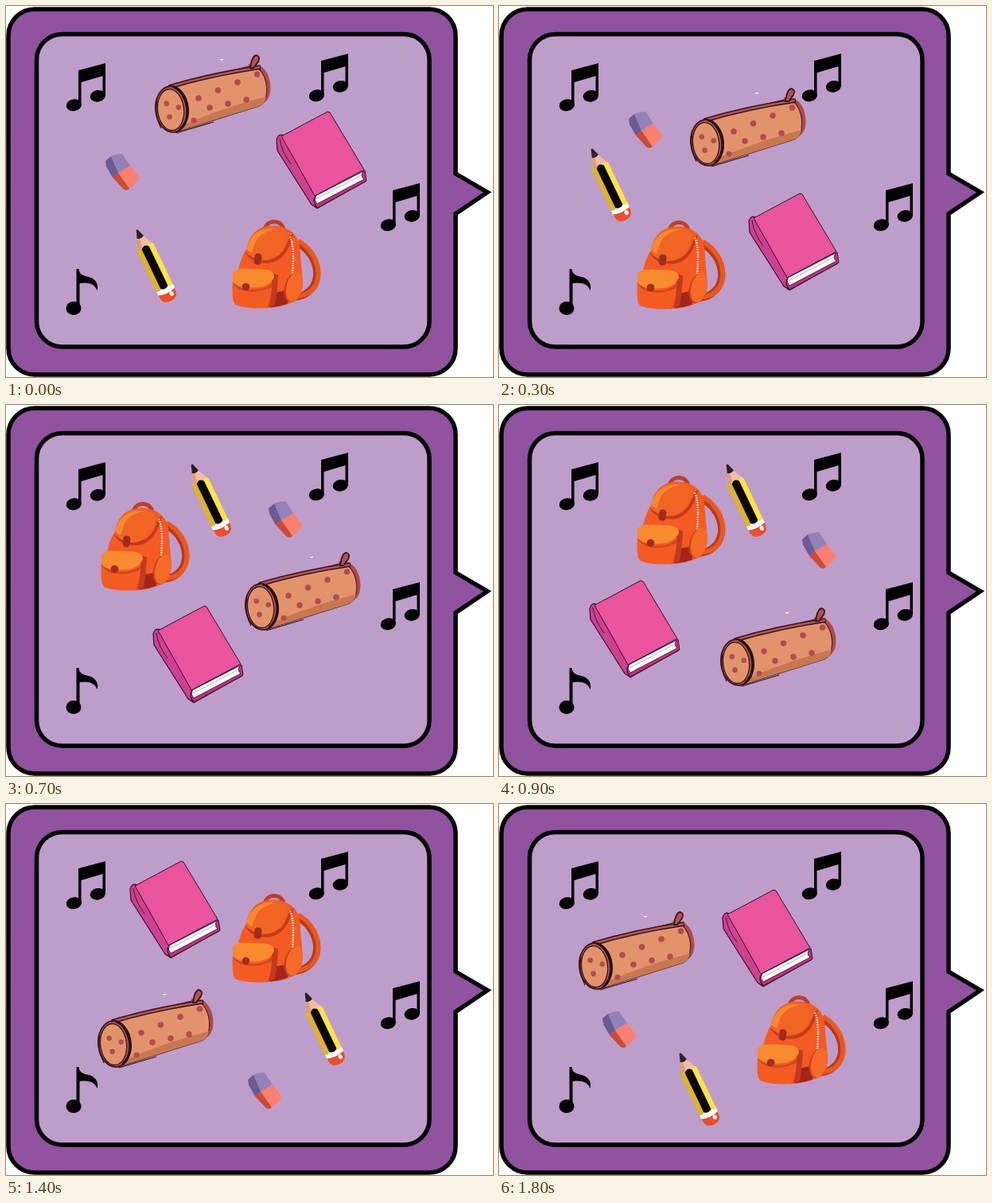
Animation of 612x467 px, one loop 1.9 s. Source, as an HTML page:

```html
<!DOCTYPE html>
<html lang="en">
<head>
<meta charset="utf-8">
<title>School things</title>
<style>
html, body { margin: 0; width: 100%; height: 100%; overflow: hidden; background: #fff; }
svg { display: block; }
</style>
</head>
<body>
<svg width="612" height="467" viewBox="0 0 612 467">
  <defs>
    <g id="pair">
      <path d="M91 81 125 72V113H121.500V88L94.500 96V125H91Z"/>
      <ellipse cx="85.300" cy="124.800" rx="9.700" ry="7.400" transform="rotate(-10 85.300 124.800)"/>
      <ellipse cx="115.300" cy="113.300" rx="9.700" ry="7.300" transform="rotate(-10 115.300 113.300)"/>
    </g>
  </defs>

  <path fill="#9152a0" stroke="#000" stroke-width="5.500" stroke-miterlimit="8"
    d="M36 4H532A33 33 0 0 1 565 37V211L605 234.500 565 261.500V431A33 33 0 0 1 532 464H36A33 33 0 0 1 3 431V37A33 33 0 0 1 36 4Z"/>
  <rect x="38.500" y="35.500" width="493.500" height="393.500" rx="32" fill="#be9dcb" stroke="#000" stroke-width="5.500"/>

  <use href="#pair"/>
  <use href="#pair" x="305" y="-12"/>
  <use href="#pair" x="395" y="151"/>
  <path d="M88.500 331H91.500C92 338 98 340 104 341 112 343 117 350 114.500 358 112 351 105 347 92.500 349V381H88.500Z"/>
  <ellipse cx="85" cy="380.500" rx="9.500" ry="8.500"/>

  <g id="eraser">
    <path fill="#9381b9" d="M132 189Q140 186 146 186L156 201 141 210Z"/>
    <path fill="#6c5a93" d="M125 195 132 189 141 210 134 216 126 202Z"/>
    <path fill="#fb8070" d="M141 210 156 201 166 214Q168 218 163 223L154 231Z"/>
    <path fill="#cb4a38" d="M134 216 141 210 155 230Q152 233 148 231Z"/>
  </g>

  <g id="pencil">
    <g transform="translate(164.500 282) rotate(-25.500)">
      <path fill="#f5bd9f" d="M-4 10H4L11.500 26H-11.500Z"/>
      <path fill="#dc9d80" d="M-4 10H-1L-4 26H-11.500Z"/>
      <path fill="#2b2028" d="M-1 0Q1-1 1.500 1L4.500 10Q0 13-4.500 10Z"/>
      <path fill="#dfb424" d="M-11.500 24Q-8 20-4 25V84H-11.500Z"/>
      <path fill="#ffe24c" d="M4 25Q8 20 11.500 24V84H4Z"/>
      <path fill="#0a0708" d="M-5 25Q0 19 5 25V82H-5Z"/>
      <path fill="#e8502c" d="M-11 86H11V90Q10 99 0 99-10 99-11 90Z"/>
      <path fill="#fff" d="M-11.500 81Q-7 83-5 80 0 84 5 80 8 83 11.500 81V86Q0 90-11.500 86Z"/>
      <ellipse cx="5" cy="91" rx="2.500" ry="3" fill="#fff"/>
    </g>
  </g>

  <g id="bag">
    <g transform="translate(-1 -.5)">
      <g fill="none">
        <path stroke="#bd3f29" stroke-width="5" d="M326 284C326 268 350 268 350 284"/>
        <path stroke="#b9391d" stroke-width="9" d="M367 299C393 312 400 347 380 361 374 366 367 367 360 367"/>
        <path stroke="#e9581f" stroke-width="6" d="M368 296C395 311 402 347 382 361 374 366 367 366 360 366"/>
      </g>
      <path fill="#f45a23" d="M303 307C306 287 320 276 338 277 356 278 368 288 370 303L374 349Q371 371 352 377 325 384 296 378L292 340Q294 320 303 307Z"/>
      <path fill="#a3251d" d="M335 362 355 358 355 375Q345 379 333 380Z"/>
      <path fill="#c63a1c" d="M301 309C313 322 331 324 344 314 354 307 354 293 362 287 358 306 349 321 333 324 315 326 305 318 301 309Z"/>
      <path fill="#f26424" d="M303 307C307 285 325 275 344 279 362 285 352 306 341 315 326 324 311 322 303 307Z"/>
      <path fill="#f88930" d="M303 305C309 286 323 278 341 281 324 284 314 291 311 310Q306 311 303 305Z"/>
      <rect x="313" y="312" width="9" height="14" rx="4" fill="#9d2d1c" transform="rotate(8 317 319)"/>
      <path fill="#c33b1e" d="M334 336 343 339Q342 361 339 377L327 381Z"/>
      <path fill="#f45b24" d="M286 345H335Q336 365 330 380 308 383 290 377 284 374 286 345Z"/>
      <path fill="#d3471d" d="M286 347C294 360 325 362 336 348L338 342 334 355Q314 363 300 359 288 356 286 347Z"/>
      <path fill="#f88a2f" d="M286 337Q288 331 298 331L326 332Q338 333 338 341 333 355 311 355 290 355 286 347Z"/>
      <circle cx="302.500" cy="354" r="4.800" fill="#a72d1b"/>
      <path fill="none" stroke="#d5cbb7" stroke-width="2.500" stroke-dasharray="2 1" d="M358 291Q364 304 361 337"/>
      <ellipse cx="362" cy="355" rx="11" ry="19" fill="#c8421e" transform="rotate(13 362 355)"/>
      <ellipse cx="363.500" cy="354" rx="10" ry="19" fill="#f56a26" transform="rotate(13 363 354)"/>
    </g>
  </g>

  <g id="book" stroke="#301326" stroke-linejoin="round">
    <path fill="#b93382" d="M387 239 451 207 453 220 391 255 383 249Z" stroke-width="1"/>
    <path fill="#fbfafb" d="M389 239 449 208Q445 214 450 218L391 249Q387 245 389 239Z" stroke-width=".8"/>
    <path fill="none" stroke="#aaa4ab" stroke-width=".8" d="M390 243 447 213"/>
    <path fill="#cf4091" d="M340 168Q342 160 349 163L389 239Q384 246 391 254L384 250 341 182Z" stroke-width="1.200"/>
    <path fill="#e9539f" d="M346 164 404 133 407 134 450 206 388 239Q366 199 346 164Z" stroke-width="1"/>
    <path fill="none" stroke-width=".9" d="M344 167Q346 183 358 199M391 254 452 221"/>
  </g>

  <g id="box">
    <path fill="#b04b4b" d="M305 73Q325 71 331 92 336 114 324 122L310 126Z"/>
    <path fill="#e1946b" stroke="#43202a" stroke-width="1.200" d="M204 101 309 75C322 77 330 95 327 113Q326 122 318 126L213 159Z"/>
    <path fill="#c87850" d="M226 148Q276 127 327 114 326 123 318 126L218 157Z"/>
    <g id="dots" fill="#b34b51"></g>
    <path fill="none" stroke="#32151e" stroke-width="5.500" d="M205 102Q258 86 320 77"/>
    <path fill="none" stroke="#b55755" stroke-width="2.500" d="M208 101Q260 86 319 77"/>
    <path fill="#b45152" stroke="#32151e" stroke-width="1.800" d="M307 78Q309 62 315 62 320 64 317 70L311 78Z"/>
    <g transform="rotate(-6 208 130)">
      <ellipse cx="208.500" cy="130" rx="20.500" ry="29" fill="#b35453" stroke="#32151e" stroke-width="1.800"/>
      <ellipse cx="207" cy="130.500" rx="16.500" ry="26" fill="#e1946b" stroke="#32151e" stroke-width="1.300"/>
      <path fill="none" stroke="#24101a" stroke-width="3" d="M213 102C230 110 234 145 215 157"/>
    </g>
    <path fill="none" stroke="#32151e" stroke-width="1.200" d="M190 119Q186 137 195 154M214 160 261 146"/>
    <path fill="#fff" d="M268.500 67H273.500Q271 70 268.500 67Z"/>
  </g>
</svg>
<script>
const byId = id => document.getElementById(id);
const TAU = 2 * Math.PI;

// Two slanted rows of dots along the case and a ring of three on its end.
const dot = (x, y, r) => `<circle cx="${x}" cy="${y}" r="${r}"/>`;
let dots = dot(236, 144, 3.6);
for (let i = 0; i < 4; i++) {
  dots += dot(242 + 24.5 * i, 116 - 10 * i, 3.8);
  if (i < 3) dots += dot(256 + 23 * i, 128 - 5 * i, 3.8);
}
byId("dots").innerHTML = dots;
let ring = "";
for (let i = 0; i < 3; i++) {
  const a = TAU * (i / 3 - 0.04);
  ring += dot(208 + 9 * Math.cos(a), 130 + 10 * Math.sin(a), 3.3);
}
byId("box").insertAdjacentHTML("beforeend", `<g fill="#b34b51">${ring}</g>`);

const STEP = 100, LOOP = 1900;
const hub = { x: 275, y: 235 };
const beats = [0, 3, 7, 9, 12, 14, 18];

// Where each item's middle is on the beats; it circles the hub clockwise between them.
const stops = {
  eraser: "146,209 184,156 351,144 402,183 359,304 325,361 151,284",
  pencil: "189,327 141,225 258,120 311,120 385,208 401,283 252,359",
  bag: "340,325 229,326 175,178 229,145 288,115 340,169 380,297",
  book: "396,194 370,297 241,314 170,282 152,193 212,133 337,169",
  box: "261,110 314,152 374,234 352,304 234,328 189,282 174,184"
};

const items = Object.entries(stops).map(([id, list]) => ({
  node: byId(id),
  polar: list.split(" ").map(p => {
    const [x, y] = p.split(",");
    return { r: Math.hypot(x - hub.x, y - hub.y), a: Math.atan2(y - hub.y, x - hub.x) };
  })
}));

function place(polar, t) {
  let i = 0;
  while (i < beats.length - 2 && t >= beats[i + 1]) i++;
  const span = beats[i + 1] - beats[i], u = (t - beats[i]) / span;
  const from = polar[i], to = polar[i + 1];
  const a = from.a + u * ((to.a - from.a + TAU) % TAU);
  const r = from.r + u * (to.r - from.r);
  const swell = 1 + 0.025 * span * Math.sin(Math.PI * u);
  return { x: r * swell * Math.cos(a), y: r * Math.sin(a) };
}

function draw(ms) {
  const t = Math.floor((ms % LOOP) / STEP);
  for (const { node, polar } of items) {
    const home = place(polar, 0), now = place(polar, t);
    node.setAttribute("transform", `translate(${Math.round(now.x - home.x)} ${Math.round(now.y - home.y)})`);
  }
}

let start;
function tick(now) {
  start ??= now;
  draw(now - start);
  requestAnimationFrame(tick);
}
draw(0);
requestAnimationFrame(tick);
</script>
</body>
</html>
```
